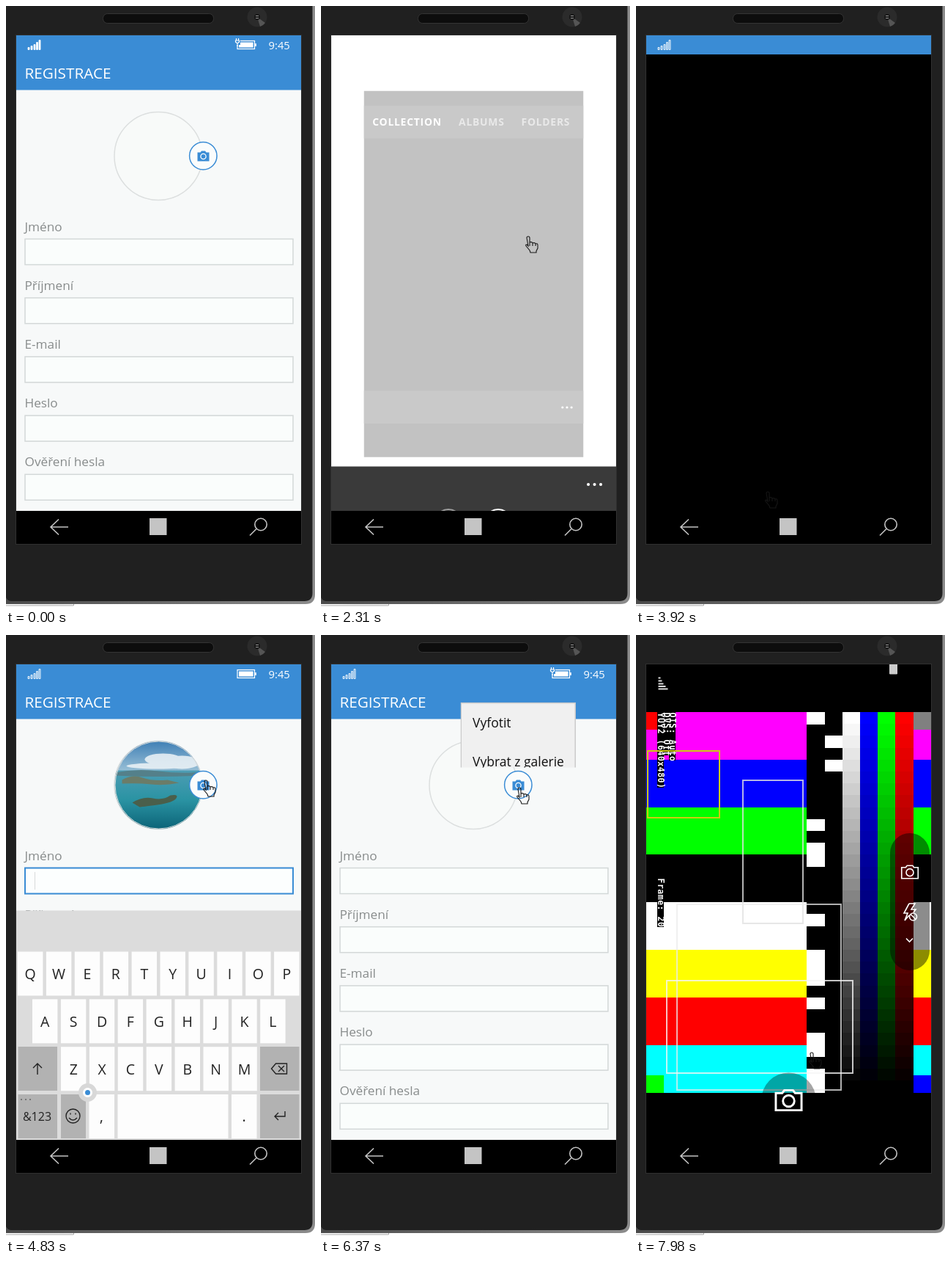
An HTML page for the animation above (8000 ms loop, 422 by 819 pixels).

```html
<!DOCTYPE html>
<html lang="cs">
<head>
<meta charset="utf-8">
<title>Registrace</title>
<style>
html, body { margin: 0; width: 100%; height: 100%; overflow: hidden; background: #fff; }
#stage { display: block; width: 422px; height: 819px; font-family: "Open Sans", "Noto Sans", sans-serif; }
.line { fill: none; stroke: #c4c4c4; stroke-width: 1.6; }
.white { fill: none; stroke: #fff; stroke-width: 1.6; }
.label { font-size: 17.2px; fill: #888c8c; }
.menu { font-size: 17.5px; fill: #111; }
.key { font-size: 19.5px; fill: #222; text-anchor: middle; }
.tab { font-size: 18px; font-weight: 700; letter-spacing: 1px; fill: #fff; }
.mono { font: 700 11.5px "DejaVu Sans Mono", monospace; letter-spacing: .5px; fill: #fff; }
</style>
</head>
<body>
<svg id="stage" viewBox="0 0 422 819">
  <defs>
    <clipPath id="screenClip"><rect x="14" y="40" width="389" height="648"/></clipPath>
    <clipPath id="roundClip"><circle cx="60" cy="60" r="60"/></clipPath>
    <linearGradient id="sky" x2="0" y2="1">
      <stop stop-color="#3f7fb5"/><stop offset="1" stop-color="#a9cbdc"/>
    </linearGradient>
    <linearGradient id="sea" x2="0" y2="1">
      <stop stop-color="#4d9db4"/><stop offset=".5" stop-color="#2a93a3"/><stop offset="1" stop-color="#0c6478"/>
    </linearGradient>
    <linearGradient id="edge"><stop stop-color="#4a4a4a"/><stop offset="1" stop-color="#8c8c8c"/></linearGradient>
    <symbol id="photo" viewBox="0 0 120 120">
      <rect width="120" height="48" fill="url(#sky)"/>
      <rect y="40" width="120" height="80" fill="url(#sea)"/>
      <g fill="#eef4f7" opacity=".85">
        <ellipse cx="66" cy="25" rx="25" ry="8"/><ellipse cx="92" cy="29" rx="24" ry="9"/>
        <ellipse cx="58" cy="34" rx="42" ry="4"/>
      </g>
      <path d="M0 43q30-6 60-2t60 1v5q-60 3-120 0z" fill="#54808a"/>
      <path d="M10 53q14-8 28-3t34 3l16 4q-20 4-38 2t-40-1z" fill="#6b7c68"/>
      <path d="M24 84q14-9 28-6t24-4q12-2 8 4t-26 9-24 3z" fill="#4a5f4b"/>
    </symbol>
    <symbol id="bars" viewBox="0 0 18 14" overflow="visible">
      <path d="M.5 13.5v-3h2v3zM4.5 13.5v-5h2v5zM8.5 13.5v-7h2v7zM12 13.5v-10h2v10zM15.5 13.5v-13h2v13z"/>
    </symbol>
    <symbol id="cameraLine" viewBox="0 0 40 32" overflow="visible">
      <path d="M2 6h9l3-4h12l3 4h9v24h-36z" fill="none"/><circle cx="20" cy="17" r="8" fill="none"/>
    </symbol>
  </defs>

  <rect width="422" height="819" fill="#fff"/>
  <path d="M0 817H92.5V813" fill="#f0f0f0" stroke="#aaa"/>
  <path d="M0 0H422V802q0 13-13 13H0z" fill="url(#edge)"/>
  <path d="M0 0H418.500V800q0 11-11 11H8q-6 0-8-5z" fill="#202020"/>
  <rect x="132.500" y="10.500" width="151" height="13" rx="6" fill="#0d0d0d" stroke="#343434"/>
  <circle cx="343" cy="15" r="13.500" fill="#2b2b2b"/>
  <path d="M343 15l11 8a13.500 13.500 0 0 1-7 5z" fill="#555"/>
  <circle cx="343" cy="15" r="4" fill="#181818"/><path d="M341 13.500h4M341 16.500h4" stroke="#999"/>
  <rect x="13.500" y="39.500" width="390" height="694" fill="#000" stroke="#303030"/>

  <g clip-path="url(#screenClip)">
    <rect id="statusBand" x="14" y="40" width="389" height="26" fill="#3a8cd5"/>
    <g id="form"></g>
    <g id="keyboard"></g>
    <g id="gallery">
      <rect x="14" y="40" width="389" height="648" fill="#fff"/>
      <g id="card">
        <rect x="14" y="40" width="389" height="648"/>
        <path d="M14 66h389v58H14zM14 570.500h389v58H14z" fill="#1f1f1f"/>
        <g class="tab">
          <text x="29" y="101.500">COLLECTION</text>
          <text x="182" y="101.500" opacity=".6">ALBUMS</text>
          <text x="293" y="101.500" opacity=".6">FOLDERS</text>
        </g>
        <path d="M366 600h.1M374 600h.1M382 600h.1" class="white" style="stroke-width:4;stroke-linecap:round"/>
        <g id="thumb">
          <use href="#photo" x="27" y="140" width="120" height="120"/>
          <rect id="picked" x="28.500" y="141.500" width="117" height="117" fill="none" stroke="#3a8cd5" stroke-width="3"/>
        </g>
      </g>
      <g id="pickBar">
        <rect x="14" y="627.500" width="389" height="61" fill="#3a3a3a"/>
        <path d="M365 652h.1M373.500 652h.1M382 652h.1" class="white" style="stroke-width:4;stroke-linecap:round"/>
        <g id="pickButtons" class="white" style="stroke-width:2">
          <circle id="confirm" cx="174" cy="657" r="18"/><path d="M166 657l6 6 11-12"/>
          <circle cx="242" cy="657" r="18"/><path d="M235 650l14 14m0-14l-14 14"/>
        </g>
      </g>
    </g>
    <g id="camera"></g>
  </g>
  <use id="signal" href="#bars" x="29.500" y="46" width="18" height="14" stroke="#fff" stroke-width=".8" fill="#fff"/>
  <g id="info">
    <rect x="316" y="47.500" width="23.500" height="11" class="white" style="stroke-width:1.200"/>
    <rect x="318" y="49.500" width="19.500" height="7" fill="#fff"/><path d="M341 51v4" class="white"/>
    <g id="plug"><rect x="312" y="43" width="8" height="10" fill="#3a8cd5"/>
      <path d="M314.500 44v3m3-3v3m-4 0h5v2q-2.500 3-5 0zM316 50v5" class="white" style="stroke-width:1.200"/></g>
    <text x="358.500" y="58.500" font-size="14.800" fill="#fff">9:45</text>
  </g>

  <svg id="menuAbove" x="190.500" y="72" width="158" height="108.500"></svg>
  <svg id="menuBelow" x="190.500" y="230" width="158" height="162"></svg>

  <g id="nav">
    <path d="M85 710H61m11-10.500L61 710l11 10.500" class="line"/>
    <rect x="196" y="698" width="23.500" height="23" fill="#c4c4c4"/>
    <circle cx="348" cy="706.500" r="8.200" class="line"/><path d="M342 712.500l-9 9" class="line"/>
  </g>
  <path id="hand" d="M-2 2q0-2 2-2t2 2v6q3-1 4 1q3-1 4 1q3-1 3 2v4l-2 4v2h-8l-1-3-5-6q-1-2 1-2l2 2zM2 8v5m4-4v4m4-3v3" fill="none" stroke="#161616" stroke-width="1.100"/>
</svg>
<script>
const LOOP = 8000, STEP = 70, BLUE = '#3a8cd5';
const el = id => document.getElementById(id);
const clamp = v => Math.min(1, Math.max(0, v));
const progress = (t, start, length) => clamp((t - start) / length);
const easeOut = p => 1 - (1 - p) ** 3;
const within = (t, a, b) => t >= a && t < b;
const show = (id, on) => el(id).style.display = on ? '' : 'none';
const rect = (x, y, w, h, fill, more = '') =>
  `<rect x="${x}" y="${y}" width="${w}" height="${h}" fill="${fill}" ${more}/>`;
const text = (cls, x, y, s, more = '') => `<text class="${cls}" x="${x}" y="${y}" ${more}>${s}</text>`;
const hollow = (x, y, w, h, color) => rect(x, y, w, h, 'none', `stroke="${color}" stroke-width="2"`);

function buildForm() {
  const fields = ['Jméno', 'Příjmení', 'E-mail', 'Heslo', 'Ověření hesla'].map((name, i) => {
    const y = 317.5 + i * 80.2;
    return text('label', 25.5, y - 11, name) +
      rect(26, y, 366, 35, '#fafdfc', 'stroke="#d3d8d8" stroke-width="1.5"');
  }).join('');
  return rect(14, 40, 389, 648, '#f7f9f9') + rect(14, 40, 389, 74.5, BLUE) +
    text('', 25.5, 98.5, 'REGISTRACE', 'font-size="20.7" fill="#fff"') +
    `<circle cx="208" cy="204.500" r="60" fill="#f8faf9" stroke="#dcdfdf" stroke-width="1.500"/>
    <g id="avatar" transform="translate(148.500 144.500)"><g clip-path="url(#roundClip)">
      <use href="#photo" width="120" height="120"/></g>
      <circle cx="60" cy="60" r="59.500" fill="none" stroke="#d4dadb"/></g>
    <circle cx="269.300" cy="204.300" r="18.700" fill="#fafcfc" stroke="${BLUE}" stroke-width="1.500"/>
    <path d="M261.500 199.500h4l1.500-2h5l1.500 2h4v12h-16z" fill="${BLUE}"/>
    <circle cx="269.500" cy="205" r="3.600" fill="${BLUE}" stroke="#fff" stroke-width="1.300"/>` + fields +
    '<g id="focus">' + rect(26, 317.5, 366, 35, '#fcfefe', `stroke="${BLUE}" stroke-width="2"`) +
    rect(39, 323, 1, 24, '#d8dada', 'id="caret"') + '</g>';
}

function buildKeyboard() {
  const pitch = 38.9, white = '#fdfdfd', grey = '#b2b2b2';
  const row = (letters, x, y) => [...letters].map((c, i) =>
    rect(x + i * pitch, y, 34.4, 60, white) + text('key', x + 17.2 + i * pitch, y + 37.5, c)).join('');
  return rect(14, 375.5, 389, 313, '#dcdcdc') +
    row('QWERTYUIOP', 16, 431.5) + row('ASDFGHJKL', 36, 496.3) + row('ZXCVBNM', 75, 561.2) +
    rect(16.5, 561, 53.5, 60, grey) + rect(347, 561, 53.5, 60, grey) +
    rect(16.5, 626, 53.5, 60, grey) + rect(75, 626, 34, 60, grey) + rect(113.5, 626, 34.5, 60, white) +
    rect(152.5, 626, 151, 60, white) + rect(308, 626, 34.5, 60, white) + rect(347, 626, 53.5, 60, grey) +
    text('key', 42.5, 662, '&amp;123', 'style="font-size:16px"') +
    text('key', 130.5, 663, ',') + text('key', 325, 663, '.') +
    `<g fill="none" stroke="#222" stroke-width="1.400">
      <path d="M43 599v-15m-6 6l6-6 6 6M362.500 591l6-7h15v14h-15zM372 587l8 8m0-8l-8 8M381 649v7h-14m5-5l-5 5 5 5"/>
      <circle cx="91.500" cy="655.500" r="9.500"/><path d="M86 658q5.500 6 11 0M88 651.500v2m7-2v2"/>
      <path d="M20 633h14" stroke="#777" stroke-width="2" stroke-dasharray="2 4"/></g>
    <circle cx="111.500" cy="623.500" r="9.500" fill="#fff" stroke="#d8d8d8" stroke-width="6"/>
    <circle cx="111.500" cy="623.500" r="3.500" fill="${BLUE}"/>`;
}

const buildMenu = (items, height) => '<g>' + rect(.75, .75, 156, height - 1.5, '#f0f0f0', 'stroke="#cbcbcb" stroke-width="1.500"') +
  items.map((s, i) => text('menu', 16.5, 34 + i * 53, s)).join('') + '</g>';

function buildCamera() {
  const colors = ['#f0f', '#00f', '#0f0', '#000', '#fff', '#ff0', '#f00', '#0ff'];
  const top = 105, band = 64.8, cell = band / 4;
  const bands = colors.map((c, i) =>
    rect(14, top + i * band, 219.3, band + .3, c) + rect(378.7, top + i * band, 24.3, band + .3, c)).join('');
  const cells = (x, rows) => rows.map(r => rect(x, top + r * cell, 24.3, cell + .3, '#fff')).join('');
  let ramps = '';
  ['r,g,b', '0,0,b', '0,g,0', 'r,0,0'].forEach((mask, col) => {
    for (let i = 0; i < 32; i++) {
      const level = Math.round(255 * (1 - i / 31));
      ramps += rect(281.5 + col * 24.3, top + i * cell, 24.6, cell + .3, `rgb(${mask.replace(/[rgb]/g, level)})`);
    }
  });
  const note = (x, y, length, s, id = '') => rect(x, y, 8.5, length, '#000') +
    `<text class="mono" ${id} transform="translate(${x + .5} ${y + .5}) rotate(90)">${s}</text>`;
  return `<g id="preview" shape-rendering="crispEdges">` + bands + rect(233.3, top, 49, band * 8, '#000') +
    cells(233.3, [0, 9, 11, 12, 17, 20, 21, 22, 24, 27, 28, 30, 31]) + cells(257.5, [2, 4]) + ramps +
    rect(14, 105, 24, 24, '#f00') + rect(14, 600, 24, 23.5, '#0f0') +
    rect(378.7, 105, 24.3, 24, '#808080') + rect(378.7, 600, 24.3, 23.5, '#00f') +
    note(45, 105, 66, 'OIS: Auto') + note(37, 105, 59, 'DVS: Off') + note(29, 105, 103, 'YUY2 (640x480)') +
    note(29, 331, 67, '', 'id="counter"') +
    hollow(15.5, 158, 98.5, 90.5, '#cccc10') + hollow(146, 197.5, 82, 195, 'rgba(225,225,225,.8)') +
    hollow(55.5, 367, 224.5, 253, 'rgba(235,235,235,.75)') + hollow(41.5, 471, 254.5, 126, 'rgba(245,245,245,.8)') +
    `</g><g id="controls">
      <rect x="347" y="270" width="54" height="187" rx="27" opacity=".45"/>
      <circle cx="208.500" cy="634" r="37.500" opacity=".35"/>
      <use href="#cameraLine" x="189" y="618" width="39" height="32" stroke="#fff" stroke-width="3"/>
      <use href="#cameraLine" x="361.500" y="313" width="25" height="20" stroke="#fff" stroke-width="2.600"/>
      <path d="M373 366h8l-5 8h6l-3 4M373 366l-7 13h5l-4 10 6-7M369 413.500l4.500 4.500 4.500-4.500" class="white"/>
      <circle cx="378.500" cy="384" r="5" class="white"/><path d="M375 380.500l7 7" class="white"/>
      <use href="#bars" transform="translate(44 57) rotate(90)" width="18" height="14" fill="#ddd"/>
      <path d="M346.500 40h10v13h-10zM348.500 40h6v11h-6z" fill="#ccc" stroke="#ccc"/></g>`;
}

el('form').innerHTML = buildForm();
el('keyboard').innerHTML = buildKeyboard();
el('camera').innerHTML = buildCamera();
el('menuAbove').innerHTML = buildMenu(['Vyfotit', 'Vybrat z galerie'], 108.5);
el('menuBelow').innerHTML = buildMenu(['Vyfotit', 'Vybrat z galerie', 'Odstranit'], 162);

// time, x, y of the fingertip
const path = [
  [70, 340, 695], [560, 271, 208], [980, 271, 208], [1470, 262, 115], [1610, 262, 146], [1820, 262, 146],
  [2310, 283, 314], [2520, 283, 314], [2870, 90, 205], [3080, 90, 205], [3430, 180, 662], [3920, 180, 662],
  [4270, 323, 323], [4340, 323, 323], [4690, 273, 198], [4970, 273, 198], [5530, 268, 353], [5740, 268, 353],
  [6090, 271, 208], [6440, 271, 208], [6930, 262, 92], [7070, 262, 92], [7350, 284, 202], [7980, 240, 569]
];
function handAt(t) {
  const i = Math.max(1, path.findIndex(p => p[0] >= t));
  const [a, b] = [path[i - 1], path[i]];
  let p = progress(t, a[0], b[0] - a[0]);
  p = p * p * (3 - 2 * p);
  return [a[1] + (b[1] - a[1]) * p, a[2] + (b[2] - a[2]) * p];
}

function menu(id, t, open, close, shift) {
  const node = el(id);
  show(id, within(t, open + 1, close + 140));
  node.style.opacity = 1 - progress(t, close, 140);
  node.firstChild.setAttribute('transform', `translate(0 ${shift * (1 - easeOut(progress(t, open, 455)))})`);
}

function render(t) {
  const back = t >= 4060;
  const onForm = t < 2030 || within(t, 4060, 7140);
  show('form', onForm);
  show('info', onForm);
  show('plug', t < 1120 || within(t, 5180, 6650));
  show('statusBand', within(t, 3850, 4060));
  show('signal', t < 2030 || within(t, 3850, 7140));
  el('signal').setAttribute('fill-opacity', t < 1820 ? 1 : .3);
  show('avatar', within(t, 4060, 5740));
  show('focus', back && t < 5040);
  show('caret', t % 1000 > 500 || t < 4340);

  show('keyboard', within(t, 4060, 5180));
  const sunk = t < 4500 ? 1 - easeOut(progress(t, 4060, 210)) : easeOut(progress(t, 4900, 280));
  el('keyboard').setAttribute('transform', `translate(0 ${313 * sunk})`);

  show('gallery', within(t, 2170, 3570));
  const grow = progress(t, 2240, 300), scale = .7 + .3 * grow;
  el('card').setAttribute('transform', `translate(208.500 369.500) scale(${scale}) translate(-208.500 -364)`
    .replace('-364)', `${-369.5 + 5.5 * 0})`));
  el('card').style.opacity = grow;
  show('thumb', t >= 2590);
  show('picked', t >= 3010);
  show('pickBar', t >= 2240);
  el('pickButtons').setAttribute('transform', `translate(0 ${47 * (1 - easeOut(progress(t, 2310, 280)))})`);
  el('confirm').style.opacity = t < 3010 ? .5 : 1;

  menu('menuAbove', t, t < 4000 ? 700 : 6230, t < 4000 ? 1820 : 7000, 60);
  menu('menuBelow', t, 5040, 5670, -80);

  show('camera', t >= 7560);
  show('preview', t >= 7700);
  el('counter').textContent = 'Frame: ' + Math.max(0, 20 - Math.round((7980 - t) * .03));
  show('nav', !within(t, 7350, 7490));

  show('hand', t >= 70);
  el('hand').setAttribute('transform', `translate(${handAt(Math.min(t, 7980))})`);
  el('hand').setAttribute('stroke', within(t, 7140, 7700) ? '#303030' : '#161616');
}

function tick(now) {
  const t = now % LOOP;
  render(Math.floor(t / STEP) * STEP);
  requestAnimationFrame(tick);
}
render(0);
requestAnimationFrame(tick);
</script>
</body>
</html>
```
